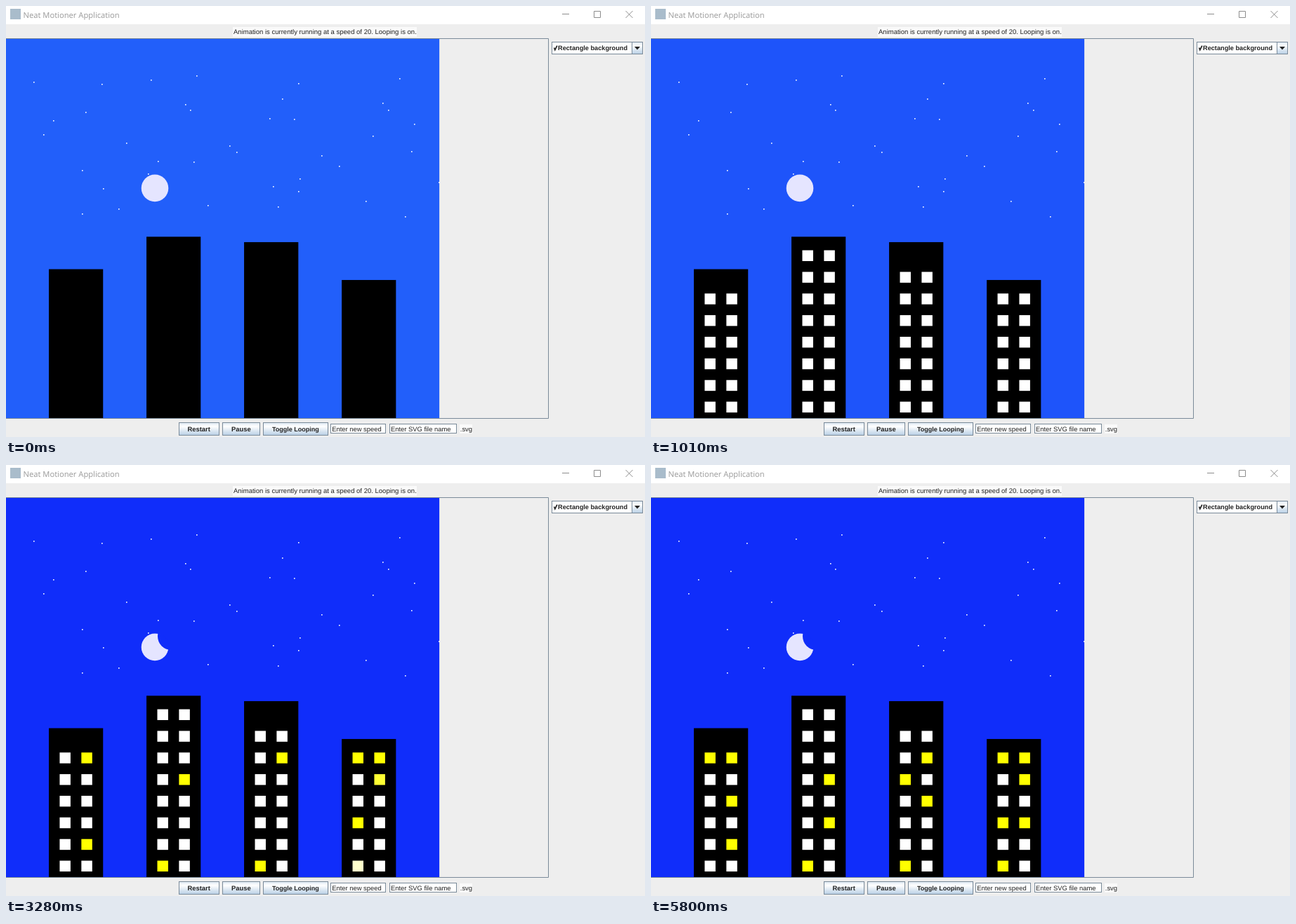
These frames come from a looping animation (910 px wide and 615 px high, 8140 ms). An HTML page with a canvas:

```html
<!DOCTYPE html>
<html lang="en">
<head>
<meta charset="utf-8">
<title>Night skyline</title>
<style>
  html, body { margin: 0; width: 100%; height: 100%; overflow: hidden; background: #eee; }
  canvas, svg { position: absolute; left: 0; top: 0; width: 910px; height: 615px; }
  text { font-family: "Liberation Sans", Arial, sans-serif; font-size: 9.4px; fill: #222; text-rendering: geometricPrecision; }
  .b { font-weight: bold; }
  .title { font-family: "Open Sans", "Noto Sans", sans-serif; font-size: 11.2px; fill: #999; }
  .frame { fill: #fff; stroke: #7a8a99; }
  .button { fill: url(#metal); stroke: #7a8a99; }
  .line { fill: none; stroke: #7a8a99; }
  .control { fill: none; stroke: #8c8c8c; }
</style>
</head>
<body>
<canvas id="scene" width="910" height="615"></canvas>
<svg viewBox="0 0 910 615">
  <defs>
    <linearGradient id="metal" x1="0" y1="0" x2="0" y2="1">
      <stop offset="0" stop-color="#dde8f3"/>
      <stop offset=".3" stop-color="#fff"/>
      <stop offset="1" stop-color="#b8cfe5"/>
    </linearGradient>
  </defs>

  <rect width="910" height="26" fill="#fff"/>
  <rect x="6" y="4" width="15" height="15" fill="#a9bccb"/>
  <text class="title" x="24.5" y="16.5">Neat Motioner Application</text>
  <path class="control" d="M792 11.5h10M837.5 7.5h9v9h-9zM882.5 7l10 10M892.5 7l-10 10"/>

  <rect x="323" y="30" width="262" height="14" fill="#fafafa"/>
  <text x="324" y="40.3" style="font-size:9.52px">Animation is currently running at a speed of 20. Looping is on.</text>
  <path class="line" d="M0 46.5H772.5V588.5H0"/>

  <rect class="frame" x="777.5" y="51.5" width="129" height="17"/>
  <rect class="button" x="891.5" y="51.5" width="15" height="17"/>
  <path d="M895 58h8l-4 4.5z" fill="#222"/>
  <path d="M780.5 59.5l1.3 3.2 3-6" fill="none" stroke="#222" stroke-width="1.7"/>
  <text class="b" x="786" y="63.3" style="font-size:9.2px">Rectangle background</text>

  <rect class="button" x="246.5" y="594.5" width="57" height="18"/>
  <rect class="button" x="308.5" y="594.5" width="53" height="18"/>
  <rect class="button" x="366.5" y="594.5" width="92" height="18"/>
  <text class="b" x="258.5" y="607.3">Restart</text>
  <text class="b" x="321" y="607.3">Pause</text>
  <text class="b" x="379" y="607.3" style="font-size:9px">Toggle Looping</text>

  <rect class="frame" x="462.5" y="596.5" width="78" height="13"/>
  <rect class="frame" x="546.5" y="596.5" width="95" height="13"/>
  <text x="464.3" y="607">Enter new speed</text>
  <text x="548" y="607">Enter SVG file name</text>
  <rect x="646" y="597" width="18" height="13" fill="#fafafa"/>
  <text x="646.8" y="607">.svg</text>
</svg>

<script>
const LOOP = 8140;
const STAR_COLS = 8, STAR_ROWS = 5;
const ctx = document.getElementById("scene").getContext("2d");

// Scene units to pixels
const px = x => x * 0.7724 - 0.8;
const py = y => y * 0.7716 + 47.6;

const towers = [
  { roof: 425, floors: 6 },
  { roof: 365, floors: 8 },
  { roof: 375, floors: 7 },
  { roof: 445, floors: 6 }
];
const towerX = i => 80 + 180 * i;

// Start of each wave and its windows: tower, left or right, floor
const waves = {
  2170: "0R2 1L1",
  2350: "3L3 2L1",
  2760: "0R6 3L6 2R6",
  2950: "3R6 1R5",
  3110: "3R5",
  3280: "3L1",
  3750: "2R4",
  4110: "3R3",
  4600: "2L5",
  5530: "0L6 0R4",
  5590: "1R3"
};
const lightStart = {};
for (const start in waves) {
  for (const cell of waves[start].split(" ")) lightStart[cell] = +start;
}

const clamp = (v, lo, hi) => Math.min(hi, Math.max(lo, v));
const mix = (a, b, p) => a + (b - a) * p;

// Share of a motion done when its steps fall evenly between two times
function progress(t, first, last, count) {
  const gap = (last - first) / (count - 1);
  return clamp(Math.floor((t - first) / gap + 1.001), 0, count) / count;
}

function seeded(seed) {
  return () => (seed = (seed * 16807) % 2147483647) / 2147483647;
}

function rect(color, x, y, w, h) {
  ctx.fillStyle = color;
  ctx.fillRect(x, y, w, h);
}

function disc(color, x, y, r) {
  ctx.fillStyle = color;
  ctx.beginPath();
  ctx.arc(x, y, r, 0, Math.PI * 2);
  ctx.fill();
}

// One star at a random place in each cell of a loose grid
function drawStars() {
  const random = seeded(2024);
  for (let i = 0; i < STAR_COLS * STAR_ROWS; i++) {
    const col = i % STAR_COLS, row = Math.floor(i / STAR_COLS);
    const x = 38 + (col + random()) * 580 / STAR_COLS;
    const y = 98 + (row + random()) * 206 / STAR_ROWS;
    rect("#fff", Math.round(x), Math.round(y), 1.6, 1.6);
  }
}

function drawTowers() {
  towers.forEach(({ roof }, i) => {
    rect("#000", px(towerX(i)), py(roof), 100 * 0.7724, 588 - py(roof));
  });
}

function windowColor(t, cell) {
  const start = lightStart[cell];
  const p = start ? progress(t, start, start + 210, 5) : 0;
  return `rgb(255,255,${Math.round(255 * (1 - p))})`;
}

// Windows rise into even towers and fall into odd ones
function drawWindows(t) {
  const p = progress(t, 40, 1010, 20);
  if (!p) return;
  towers.forEach(({ floors }, i) => {
    const from = i % 2 ? -20 : 780;
    for (let floor = 0; floor <= floors; floor++) {
      const y = py(mix(from, 710 - 40 * floor, p));
      for (const side of "LR") {
        const x = px(towerX(i) + (side === "L" ? 20 : 60));
        rect(windowColor(t, i + side + floor), x, y, 15.45, 15.45);
      }
    }
  });
}

function drawMoon(t, sky) {
  const x = 212, y = 259.9, r = 19.3;
  disc("#e5e5ff", x, y, r);
  const p = progress(t, 2170, 2560, 9);
  if (!p) return;
  ctx.save();
  ctx.beginPath();
  ctx.arc(x, y, r + 1, 0, Math.PI * 2);
  ctx.clip();
  disc(sky, x + mix(30.5, 23.3, p), y + mix(-24, -15.3, p), r);
  ctx.restore();
}

function skyColor(t) {
  const p = progress(t, 550, 2560, 40);
  return `rgb(${Math.round(mix(34, 16, p))},${Math.round(mix(95, 45, p))},250)`;
}

function draw(t) {
  const sky = skyColor(t);
  ctx.clearRect(0, 0, 910, 615);
  ctx.save();
  ctx.beginPath();
  ctx.rect(0, 47, 772, 541);
  ctx.clip();
  rect(sky, 0, 47, px(800), 541);
  drawStars();
  drawTowers();
  drawWindows(t);
  drawMoon(t, sky);
  ctx.restore();
}

function frame() {
  draw(performance.now() % LOOP);
  requestAnimationFrame(frame);
}
frame();
</script>
</body>
</html>
```
